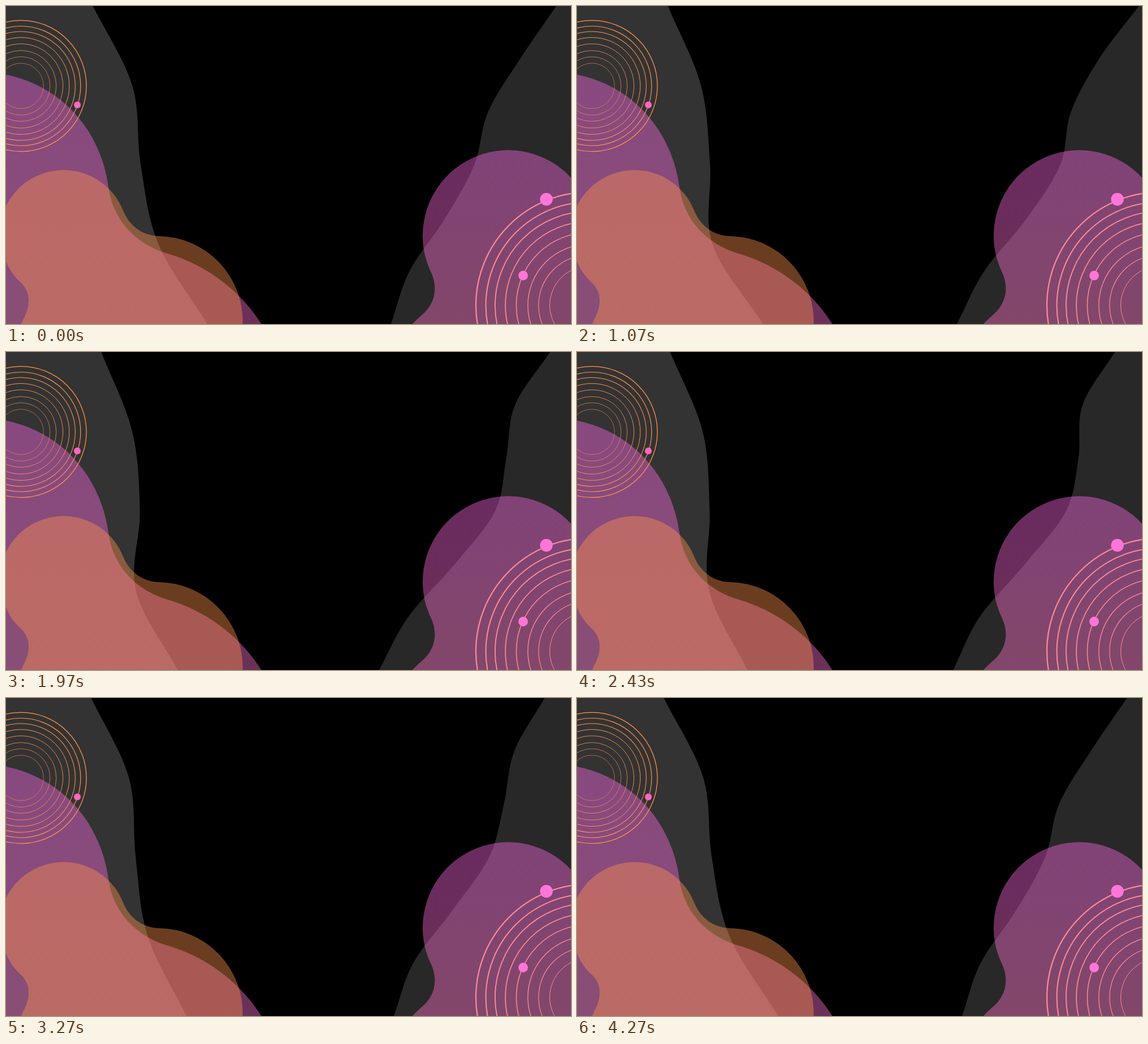
An HTML page for the animation above (4.33 s loop, 998 px wide and 561 px high).

```html
<!DOCTYPE html>
<html lang="en">
<head>
<meta charset="utf-8">
<title>Flowing shapes</title>
<style>
  html, body { margin: 0; width: 100%; height: 100%; overflow: hidden; background: #000; }
  svg { display: block; width: 100vw; height: 100vh; }
</style>
</head>
<body>
<svg viewBox="0 0 998 561" preserveAspectRatio="none">
  <defs>
    <linearGradient id="pinkLeft" gradientUnits="userSpaceOnUse" x1="0" y1="120" x2="0" y2="561">
      <stop offset="0" stop-color="rgb(254,103,234)"/>
      <stop offset="1" stop-color="rgb(255,116,208)"/>
    </linearGradient>
    <linearGradient id="pinkRight" gradientUnits="userSpaceOnUse" x1="0" y1="254" x2="0" y2="561">
      <stop offset="0" stop-color="rgb(253,103,230)"/>
      <stop offset="1" stop-color="rgb(254,113,196)"/>
    </linearGradient>
  </defs>

  <path id="waveLeft" fill="#333"/>
  <path id="waveRight" fill="#282828"/>

  <g fill-opacity=".42">
    <path fill="url(#pinkLeft)" d="M0 121C95 140 167 216 181 320C189 378 230 420 283 436C350 455 412 499 451 561H0Z"/>
    <path fill="#ff924c" d="M27 561C30 552 40 539 40 520C40 505 34 495 24 486C14 477 4 462 0 450V353A113 113 0 0 1 182 323C195 336 201 347 207 361C218 388 241 405 270 406A150 150 0 0 1 418 561Z"/>
    <path fill="url(#pinkRight)" d="M998 303A151 151 0 0 0 736 405C736 429 741 449 751 470C763 496 758 523 738 542C731 548 724 554 718 561H998Z"/>
  </g>

  <g id="ringsLeft" fill="none" stroke="#ff914d"/>
  <g id="ringsRight" fill="none" stroke="#fc8b97"/>

  <circle cx="126" cy="174.5" r="6" fill="#ff66c4"/>
  <g fill="#ff75d8">
    <circle cx="954.5" cy="341" r="11.2"/>
    <circle cx="913.5" cy="475.5" r="8.4"/>
  </g>
</svg>
<script>
const LOOP = 4330;
const BEATS = 8;
const BOTTOM = 561;
const byId = id => document.getElementById(id);

// Knots run evenly from top to bottom: [rest x, cosine swing, sine swing].
const waves = [
  {
    path: byId("waveLeft"), side: 0, ripple: 2.5,
    knots: [[158, -7, 5], [220.5, 0, 1], [234.5, 1, 3], [247.5, 19.5, -5.5], [326, 27, 5]]
  },
  {
    path: byId("waveRight"), side: 998, ripple: -4,
    knots: [[968, 8, 20.5], [906, 6, 12], [872, -16.5, -3.5], [849.5, -18.5, 0],
            [788, -8, 3], [715.5, 1.5, 0], [674, 10, -7]]
  }
];

// Both ring sets share one design at different scales.
function addRings(id, cx, cy, size) {
  const spread = [1, 0.912, 0.83, 0.739, 0.642, 0.54, 0.445, 0.346];
  spread.forEach((part, i) => {
    const ring = document.createElementNS("http://www.w3.org/2000/svg", "circle");
    const attrs = { cx, cy, r: size * part, "stroke-width": size * (0.0112 - 0.0009 * i) };
    for (const name in attrs) ring.setAttribute(name, attrs[name]);
    byId(id).append(ring);
  });
}

// Smooth curve through the knots, closed along one side of the stage.
function wavePath(xs, side) {
  const last = xs.length - 1;
  const step = BOTTOM / last;
  const slope = i => {
    const a = Math.max(i - 1, 0), b = Math.min(i + 1, last);
    return (xs[b] - xs[a]) / (b - a) / 3;
  };
  let d = `M${side} 0L${xs[0]} 0`;
  for (let i = 0; i < last; i++) {
    const y = i * step;
    d += `C${xs[i] + slope(i)} ${y + step / 3} ${xs[i + 1] - slope(i + 1)} ${y + step * 2 / 3} ${xs[i + 1]} ${y + step}`;
  }
  return d + `L${side} ${BOTTOM}Z`;
}

// The swing eases to a short rest on every beat.
function angleAt(time) {
  const pos = time / LOOP * BEATS;
  const ease = 0.5 - 0.5 * Math.cos(Math.PI * (pos % 1));
  return (Math.floor(pos) + ease) / BEATS * 2 * Math.PI;
}

function draw(now) {
  const angle = angleAt(Math.max(0, now - start) % LOOP);
  for (const { path, side, ripple, knots } of waves) {
    const xs = knots.map(([rest, c, s]) =>
      rest + c * Math.cos(angle) + s * Math.sin(angle) + ripple * Math.cos(2 * angle));
    path.setAttribute("d", wavePath(xs, side));
  }
  requestAnimationFrame(draw);
}

addRings("ringsLeft", 26.3, 141, 115.7);
addRings("ringsRight", 1029.5, 528, 199.5);

const start = performance.now();
draw(start);
</script>
</body>
</html>
```
